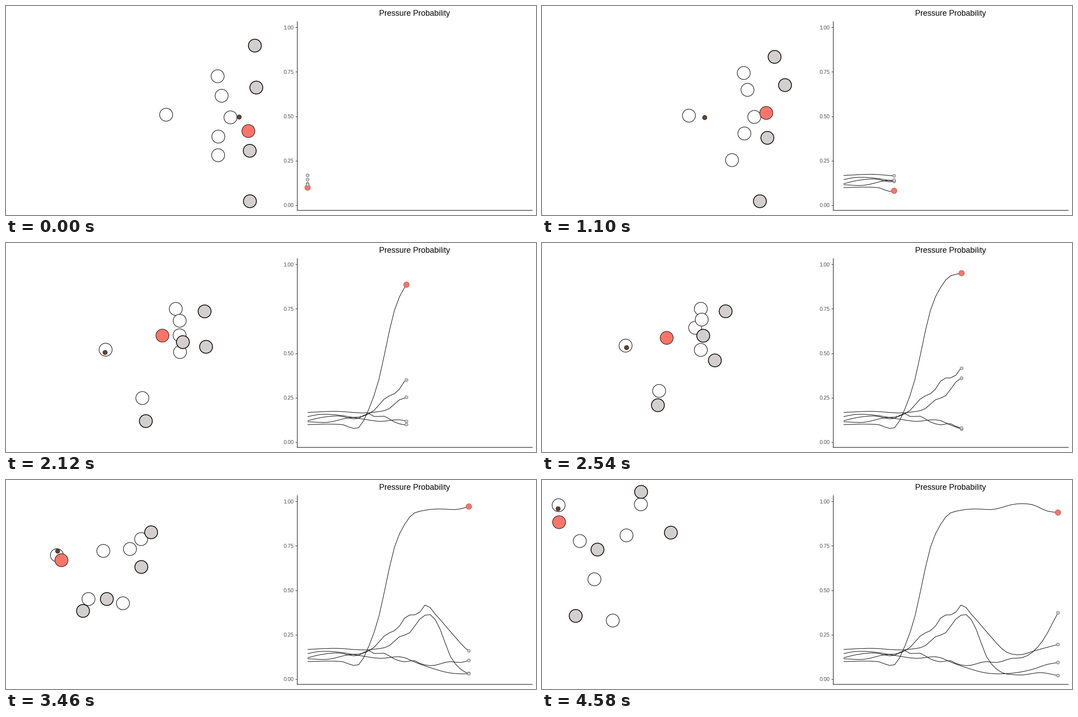
Animation of 1189 by 471 pixels, one loop 4.63 s. Source, as a matplotlib script:

```python
import numpy as np
import matplotlib.pyplot as plt
from matplotlib.animation import FuncAnimation
from matplotlib.patches import Circle

W, H, DPI = 1189, 471, 100
FRAMES, LOOP_MS = 100, 4630
PX = 72 / DPI  # one pixel in points

GRAY, RED, BROWN = "#d3cfce", "#ff7568", "#604631"

# Positions are known at these frame numbers and eased in between.
KEYS = [0, 23, 37, 54, 65, 83, 98]
TIP_X = [676.3, 789.7, 860, 941, 995, 1081.2, 1157.2]

TACKLE_TOP = [(474.5, 158), (452.3, 150.7), (404, 148), (356, 148),
              (325.3, 143.7), (278, 113), (221.5, 54.5)]
CENTER = [(503.3, 250.7), (476, 249.7), (424, 223.3), (343.3, 190.7),
          (274.5, 172.3), (164, 149), (84.5, 137.3)]
GUARD_TOP = [(483.5, 202), (460.7, 188.7), (416, 178), (358, 172.3),
             (316.6, 167.5), (239.7, 141), (189.3, 124.5)]
GUARD_LOW = [(476, 294), (453.7, 287), (416, 258), (356, 240.7),
             (305.3, 257.7), (220, 297), (158.5, 316.5)]
TACKLE_LOW = [(475.6, 336), (426, 347), (347.2, 354.3), (262.5, 333),
              (216.3, 295), (157.3, 246), (117.3, 223.5)]
PASSER = [(359, 244.7), (329.3, 246.8), (258, 243.3), (187.2, 231),
          (144.6, 204.3), (85, 127.7), (37, 56.5)]

EDGE_TOP = [(558, 89), (521.5, 114.4), (472.5, 145.8), (411.7, 153.6),
            (360.7, 139), (290.3, 88.7), (222, 26.5)]
INNER_TOP = [(561.3, 183.5), (544.9, 178), (490.9, 205.2), (387.5, 264.3),
             (288.4, 279.3), (177.8, 238.5), (124.2, 156.5)]
INNER_LOW = [(546.5, 326), (505.3, 296.8), (432, 243.7), (361.4, 208.7),
             (323.9, 204.3), (291.2, 178), (288.8, 118.3)]
EDGE_LOW = [(546.9, 439.7), (488.5, 439.7), (370, 425.3), (259.7, 365.3),
            (208.6, 318.2), (137.8, 286), (75.3, 306)]
STAR = [(543.5, 281.5), (502.9, 240.7), (409, 208.5), (279.5, 213.5),
        (183.2, 210), (80.6, 142.7), (38, 94.8)]

# Ball offset from the passer: held at the line, snapped, then carried.
BALL_KEYS = [0, 10, 23, 26, 37, 54, 65, 83, 98]
BALL_DX = [163.8, 167.5, 35.5, 2, -4.2, 2.2, 0.7, 2.7, -1.2]
BALL_DY = [5.3, 5, 4.3, 5, 7.8, 4.5, -15.3, -3, 8]

# Probability curves as (sample, height in pixels) knots.
SAMPLES = np.arange(43)
SAMPLE_X = np.linspace(TIP_X[0], TIP_X[-1], len(SAMPLES))
STAR_CURVE = [(0, 409), (5, 408), (7, 409.5), (9, 417.5), (10, 416),
              (12, 374), (14, 306), (16, 199), (17, 152), (19, 100),
              (20, 83), (23, 68), (26, 65), (29, 66.3), (34, 53.5),
              (37, 55.3), (40, 70), (42, 73)]
FADING = [(0, 381.5), (5, 379), (13, 381), (16, 373), (18, 353), (20, 344),
          (22, 313), (23, 304.5), (24, 303), (25, 314), (26, 337), (28, 398),
          (30, 426), (34, 439), (39, 434), (42, 440.5)]
LOW = [(0, 391), (2, 386.5), (6, 387.5), (10, 395), (14, 401.5), (19, 400),
       (21, 410), (24, 422.5), (28, 434.7), (32, 436), (37, 426.5),
       (40, 415), (42, 411)]
LATE = [(0, 400.3), (2, 394.5), (6, 389.5), (10, 395), (12, 384),
        (13, 390.5), (15, 390), (17, 403), (19, 409.5), (21, 407),
        (22, 413), (24, 418), (28, 409), (30, 411), (33, 401.5),
        (35, 400), (37, 388), (39, 362), (42, 299)]
PEAKED = [(0, 402.5), (4, 403.7), (8, 393.5), (11, 389.5), (13, 377),
          (15, 351.5), (18, 329), (19, 311), (22, 297.5), (23, 281.5),
          (25, 302), (28, 341.5), (32, 388), (35, 393), (37, 386),
          (42, 370.3)]


def smooth(keys, values, at, from_rest=False):
    """Cubic Hermite path through values given at keys."""
    keys, values = np.array(keys, float), np.array(values, float)
    slopes = np.gradient(values, keys, axis=0)
    if from_rest:
        slopes[0] = 0
    i = np.clip(np.searchsorted(keys, at, side="right") - 1, 0, len(keys) - 2)
    span = keys[i + 1] - keys[i]
    t = (at - keys[i]) / span
    ease = t * t * (3 - 2 * t)
    return (values[i] + (values[i + 1] - values[i]) * ease
            + span * t * (1 - t) * ((1 - t) * slopes[i] - t * slopes[i + 1]))


plt.rcParams["font.family"] = "Liberation Sans"
fig = plt.figure(figsize=(W / DPI, H / DPI), dpi=DPI, facecolor="white")
ax = fig.add_axes([0, 0, 1, 1])
ax.set_xlim(0, W)
ax.set_ylim(H, 0)
ax.axis("off")


def add_line(xs, ys, color="black"):
    return ax.plot(xs, ys, color=color, lw=1.1 * PX, zorder=1,
                   solid_capstyle="butt")[0]


def add_disc(radius, fill, edge, width, z):
    return ax.add_patch(Circle((0, 0), radius, fc=fill, ec=edge,
                               lw=width * PX, zorder=z))


def add_curve(knots, radius, fill, edge, z):
    heights = smooth(*zip(*knots), SAMPLES)
    return add_line([], []), add_disc(radius, fill, edge, 0.9, z), heights


add_line([652.5, 652.5], [34, 460.2])
add_line([652, 1181], [459.7, 459.7])
for i in range(5):
    y = 448.9 - 100.15 * i
    add_line([648.7, 652.5], [y, y], color="#333333")
    ax.text(645.3, y + 4.3, f"{i / 4:.2f}", size=11.7 * PX, color="#4d4d4d",
            ha="right", va="baseline")
ax.text(916.7, 22.3, "Pressure Probability", size=17.8 * PX, color="black",
        ha="center", va="baseline")

blockers = TACKLE_TOP, CENTER, GUARD_TOP, GUARD_LOW, TACKLE_LOW, PASSER
rushers = EDGE_TOP, INNER_TOP, INNER_LOW, EDGE_LOW
movers = [(add_disc(14.6, "white", "#2b2b2b", 1.4, 3 + i), path)
          for i, path in enumerate(blockers)]
movers += [(add_disc(14.5, GRAY, "black", 1.7, 10 + i), path)
           for i, path in enumerate(rushers)]
movers.append((add_disc(14.6, RED, "#3a2a2a", 1.4, 15), STAR))
ball = add_disc(4.9, BROWN, "#33261c", 1, 16)

curves = [add_curve(STAR_CURVE, 6.2, RED, "#a04a44", 3)]
curves += [add_curve(knots, 3.4, "#cfcfcf", "#666666", 4)
           for knots in (FADING, LOW, LATE, PEAKED)]


def update(frame):
    frame = min(frame, KEYS[-1])
    for disc, path in movers:
        disc.center = smooth(KEYS, path, frame, from_rest=True) + 0.3
    offset = [np.interp(frame, BALL_KEYS, d) for d in (BALL_DX, BALL_DY)]
    ball.center = smooth(KEYS, PASSER, frame, from_rest=True) + offset + 0.3

    tip_x = np.interp(frame, KEYS, TIP_X)
    past = SAMPLE_X < tip_x
    for line, dot, heights in curves:
        tip_y = np.interp(tip_x, SAMPLE_X, heights)
        line.set_data(np.append(SAMPLE_X[past], tip_x) + 0.3,
                      np.append(heights[past], tip_y) + 0.3)
        dot.center = tip_x + 0.3, tip_y + 0.3
    return []


anim = FuncAnimation(fig, update, frames=FRAMES, interval=LOOP_MS / FRAMES,
                     repeat=True, repeat_delay=0)
plt.show()
```
